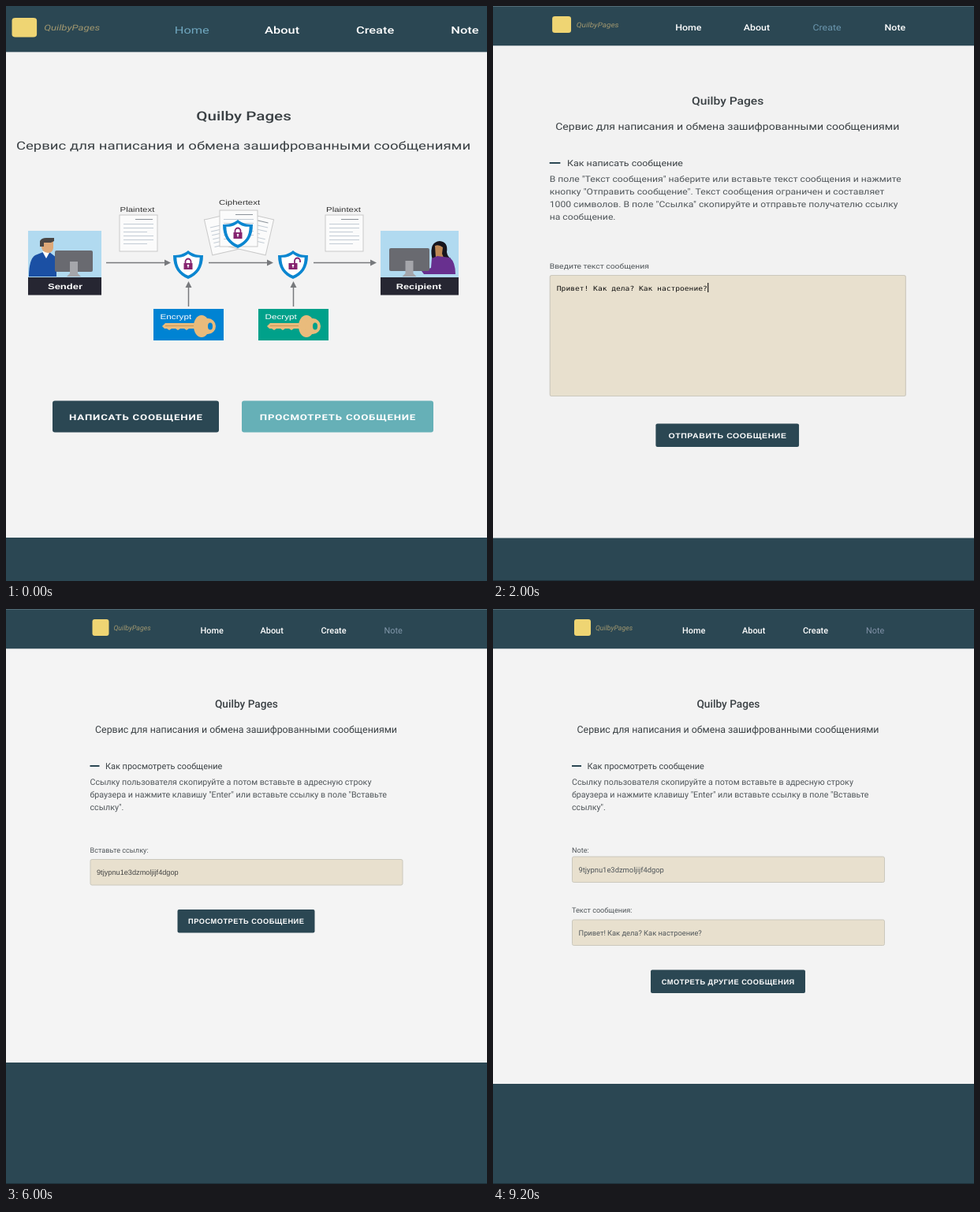
An HTML page that plays this animation: 610 by 729 pixels, repeating every 10 s.

```html
<!DOCTYPE html>
<html lang="ru">
<head>
<meta charset="utf-8">
<title>Quilby Pages</title>
<style>
  html, body { margin: 0; width: 100%; height: 100%; overflow: hidden; background: #f3f3f3; }
  svg { display: block; }
  text { font-family: Roboto, "Open Sans", sans-serif; text-rendering: geometricPrecision; }
  .arial { font-family: "Liberation Sans", Arial, sans-serif; }
  .mono { font-family: "DejaVu Sans Mono", monospace; }
</style>
</head>
<body>
<svg id="stage" width="610" height="729" viewBox="0 0 610 729"></svg>
<script>
const SLIDE = 2000, DARK = '#2b4753', INK = '#3a4044', SOFT = '#50565a', SAND = '#e8e0ce';
const BRAND = 'Quilby Pages', CENTER = 198, WIDTH = 397;

const rect = (x, y, w, h, fill, more = '') =>
  `<rect x="${x}" y="${y}" width="${w}" height="${h}" fill="${fill}" ${more}/>`;
const path = (d, fill, more = '') => `<path d="${d}" fill="${fill}" ${more}/>`;
const oval = (x, y, rx, ry, fill) => `<ellipse cx="${x}" cy="${y}" rx="${rx}" ry="${ry}" fill="${fill}"/>`;
const text = (x, y, size, fill, str, more = '') =>
  `<text x="${x}" y="${y}" font-size="${size}" fill="${fill}" ${more}>${str}</text>`;
const group = (transform, body) => `<g transform="${transform}">${body}</g>`;
const mid = 'text-anchor="middle"';

// Page parts, measured from the left edge of the content column
function header(active, activeColor) {
  const links = [['Home', 140], ['About', 216], ['Create', 293], ['Note', 373]];
  return rect(3, 13, 21, 21, '#efd573', 'rx="3"') +
    text(30, 27, 8.8, '#a1976f', BRAND.replace(' ', ''), 'font-style="italic"') +
    links.map(([name, x]) => name === active
      ? text(x, 30.5, 10.9, activeColor, name)
      : text(x, 30.5, 10.9, '#fff', name, 'font-weight="500"')).join('') +
    text(CENTER + .4, 125, 13.7, INK, BRAND, mid + ' font-weight="500"') +
    text(CENTER, 156.5, 12.35, INK, 'Сервис для написания и обмена зашифрованными сообщениями', mid);
}

const help = (title, lines) =>
  rect(0, 198, 12, 2, DARK) + text(19.6, 202.8, 10.9, INK, title) +
  lines.map((line, i) => text(0, 223 + 16 * i, 10.7, SOFT, line)).join('');

const label = (y, str) => text(0, y, 9.15, SOFT, str);
const field = (y, h) => rect(.5, y + .5, WIDTH - 1, h - 1, SAND, 'rx="2" stroke="#cbc8bd"');
const button = (y, w, str) => rect(CENTER - w / 2, y, w, 29.5, DARK, 'rx="2"') +
  text(CENTER + .25, y + 18, 9.25, '#fff', str, mid + ' class="arial" font-weight="700" letter-spacing=".5"');

function page({ left, sx = 1, sy = 1, foot, bg, active, tint, body, extra = '', edge = true }) {
  return rect(0, 0, 610, 729, bg) + rect(0, 0, 610, 50.3 * sy, DARK) + rect(0, foot, 610, 729 - foot, DARK) +
    (edge ? rect(0, 0, 610, 1, '#536d78') + rect(0, 728, 610, 1, '#1d303a') : '') +
    group(`translate(${left}) scale(${sx} ${sy})`, header(active, tint) + body) + extra;
}

// Encryption diagram, in stage coordinates
const caption = (x, y, size, fill, str, more = '') =>
  group(`translate(${x} ${y}) scale(1.3 1)`, text(0, 0, size, fill, str, 'class="arial" ' + more));

function sheet(x, y, turn = 0) {
  let out = rect(-24, -23, 48, 46, '#fbfbfb', 'stroke="#c9c9c9"') + rect(-4, -18, 22, 1, '#8b9299');
  for (let i = 0; i < 6; i++)
    out += rect(-19, -12 + i * 5, i === 2 || i === 5 ? 30 : 38, 1, '#c3ccd5');
  return group(`translate(${x} ${y}) rotate(${turn})`, out);
}

function shield(x, y, open) {
  const d = 'M0-18C6-13 12-12 19-12C19 4 12 13 0 18C-12 13-19 4-19-12C-12-12-6-13 0-18Z';
  const bow = open ? 'M2-1V-5a3.5 3.5 0 0 1 7 0V-3' : 'M-3.5-1V-4a3.5 3.5 0 0 1 7 0V-1';
  return group(`translate(${x} ${y})`,
    path(d, '#0b86d0') + path(d, '#fff', 'transform="scale(.77)"') +
    path(bow, 'none', 'stroke="#86246f" stroke-width="1.8"') +
    rect(-5.5, -2, 11, 8, '#86246f') + oval(0, 1, 1.3, 1.3, '#fff') + rect(-.5, 1, 1, 3, '#fff'));
}

const arrow = (x, y, length, turn = 0) => group(`translate(${x} ${y}) rotate(${turn})`,
  rect(0, -.75, length - 6, 1.5, '#77797c') + path(`M${length} 0l-8-4v8z`, '#77797c'));

function keyBox(x, fill, str) {
  const gold = '#e9bb7c';
  return group(`translate(${x} 384)`, rect(0, 0, 89, 40, fill) +
    path('M11 22L15 18H52V25H45L42 27L39 25H34L31 27L28 25H23L20 27L17 25H14Z', gold) +
    oval(61, 22, 10, 14, gold) + oval(69, 22, 10, 10, gold) + oval(72, 22, 3, 4.5, fill) +
    rect(15, 21, 36, 1, '#c99654')) + caption(x + 8.5, 397, 9, '#fff', str);
}

const monitor = (x, y, w, h, base) => rect(x, y, w, h, '#696a70', 'rx="2"') +
  path(`M${x + w / 2 - 5} ${y + h - 13}h10v${base - y - h + 9}l4 4h-18l4-4z`, '#a5a6ab');

const diagram = () =>
  rect(28, 285, 93, 59, '#b1daf0') +
  path('M29 343Q29 321 37 316L47 312H55L64 319V343Z', '#1b50a4') +
  path('M46 311L51 320L56 311Z', '#fff') +
  path('M45 298H60V307Q59 313 53 313Q46 312 45 306Z', '#dda878') +
  path('M43 305V298Q45 294 51 294H61V298L57 300H48V305Z', '#4a4645') +
  monitor(62, 310, 48, 27, 343) +
  rect(28, 344, 93, 22.5, '#262632') +
  rect(475, 285, 99, 59, '#b1daf0') +
  path('M540 318Q537 299 550 298Q561 299 559 312Q560 318 564 320L541 322Z', '#17151d') +
  path('M544 304Q549 302 554 306L553 314L555 319H545Z', '#bf8956') +
  path('M527 336L539 332L540 320L547 317L563 319Q570 325 570 340H530Z', '#68308f') +
  monitor(486, 307, 51, 29, 343) +
  rect(475, 344, 99, 22.5, '#262632') +
  caption(75, 359, 10, '#fff', 'Sender', mid + ' font-weight="700"') +
  caption(523.5, 359, 9.8, '#fff', 'Recipient', mid + ' font-weight="700"') +
  caption(144.5, 261, 8.8, '#333', 'Plaintext') + caption(270, 251.5, 8.8, '#333', 'Ciphertext') +
  caption(406, 261, 8.8, '#333', 'Plaintext') +
  sheet(168, 288) + sheet(429, 288) +
  sheet(280, 288, -13) + sheet(311, 288, 13) + sheet(295, 282) +
  shield(294, 289) + shield(231, 328) + shield(364, 328, true) +
  arrow(127, 325.5, 82) + arrow(257, 325.5, 82) + arrow(390, 325.5, 80) +
  arrow(231.5, 381, 32, -90) + arrow(364.5, 381, 32, -90) +
  keyBox(187, '#0083d3', 'Encrypt') + keyBox(320, '#00a18a', 'Decrypt');

const homeButton = (x, w, fill, str) => rect(x, 500.5, w, 40, fill, 'rx="3"') +
  group(`translate(${x + w / 2} 525) scale(1.505 1.16)`,
    text(.25, 0, 8.8, '#fff', str, mid + ' font-weight="700" letter-spacing=".5"'));

const note = '9tjypnu1e3dzmoljijf4dgop', hello = 'Привет! Как дела? Как настроение?';
const writeHelp = help('Как написать сообщение', [
  'В поле "Текст сообщения" наберите или вставьте текст сообщения и нажмите',
  'кнопку "Отправить сообщение". Текст сообщения ограничен и составляет',
  '1000 символов. В поле "Ссылка" скопируйте и отправьте получателю ссылку',
  'на сообщение.']);
const readHelp = help('Как просмотреть сообщение', [
  'Ссылку пользователя скопируйте а потом вставьте в адресную строку',
  'браузера и нажмите клавишу "Enter" или вставьте ссылку в поле "Вставьте',
  'ссылку".']);

const pages = [
  { left: 3, sx: 1.505, sy: 1.16, foot: 674, bg: '#f3f3f3', active: 'Home', tint: '#6fa6be', body: '', edge: false,
    extra: diagram() + homeButton(59, 211, DARK, 'НАПИСАТЬ СООБЩЕНИЕ') +
      homeButton(299, 243, '#66b0b7', 'ПРОСМОТРЕТЬ СООБЩЕНИЕ') },
  { left: 71.7, sx: 1.139, foot: 674.5, bg: '#f2f2f2', active: 'Create', tint: '#6c98b0',
    body: writeHelp + label(332.5, 'Введите текст сообщения') + field(341, 154) +
      text(8, 360.5, 8.45, '#111', hello, 'class="mono"') + rect(176, 351, 1, 12, '#111') +
      button(529.5, 159.5, 'ОТПРАВИТЬ СООБЩЕНИЕ') },
  { left: 79, sx: 1.139, foot: 575, bg: '#f2f4f3', active: 'Create', tint: '#7699b8',
    body: writeHelp + label(332.5, 'Ссылка:') + field(341, 33.5) +
      text(8, 361, 9.4, SOFT, 'http://localhost:3000/note/', 'letter-spacing=".32"') +
      rect(130, 349.5, 109.5, 16, '#2f8cf2') + text(130, 361, 9.4, '#fff', note) +
      button(404.5, 152.5, 'НАПИСАТЬ СООБЩЕНИЕ') },
  { left: 106.5, foot: 575, bg: '#f4f4f4', active: 'Note', tint: '#8197aa',
    body: readHelp + label(309, 'Вставьте ссылку:') + field(317, 33.5) +
      text(8.5, 336.5, 9.2, '#444', note, 'class="arial"') + button(381, 174, 'ПРОСМОТРЕТЬ СООБЩЕНИЕ') },
  { left: 100, foot: 602, bg: '#f3f3f3', active: 'Note', tint: '#7f90a6',
    body: readHelp + label(309, 'Note:') + field(313.5, 33.5) + text(8.5, 333.5, 9.4, SOFT, note) +
      label(385, 'Текст сообщения:') + field(393.5, 33.5) + text(8.5, 413.5, 9.3, SOFT, hello) +
      button(457.5, 196, 'СМОТРЕТЬ ДРУГИЕ СООБЩЕНИЯ') }
];

const stage = document.getElementById('stage');
stage.innerHTML = pages.map(p => `<g>${page(p)}</g>`).join('');
const slides = [...stage.children];

function draw() {
  const current = Math.floor(performance.now() / SLIDE) % slides.length;
  slides.forEach((slide, i) => slide.style.display = i === current ? '' : 'none');
  requestAnimationFrame(draw);
}
draw();
</script>
</body>
</html>
```
